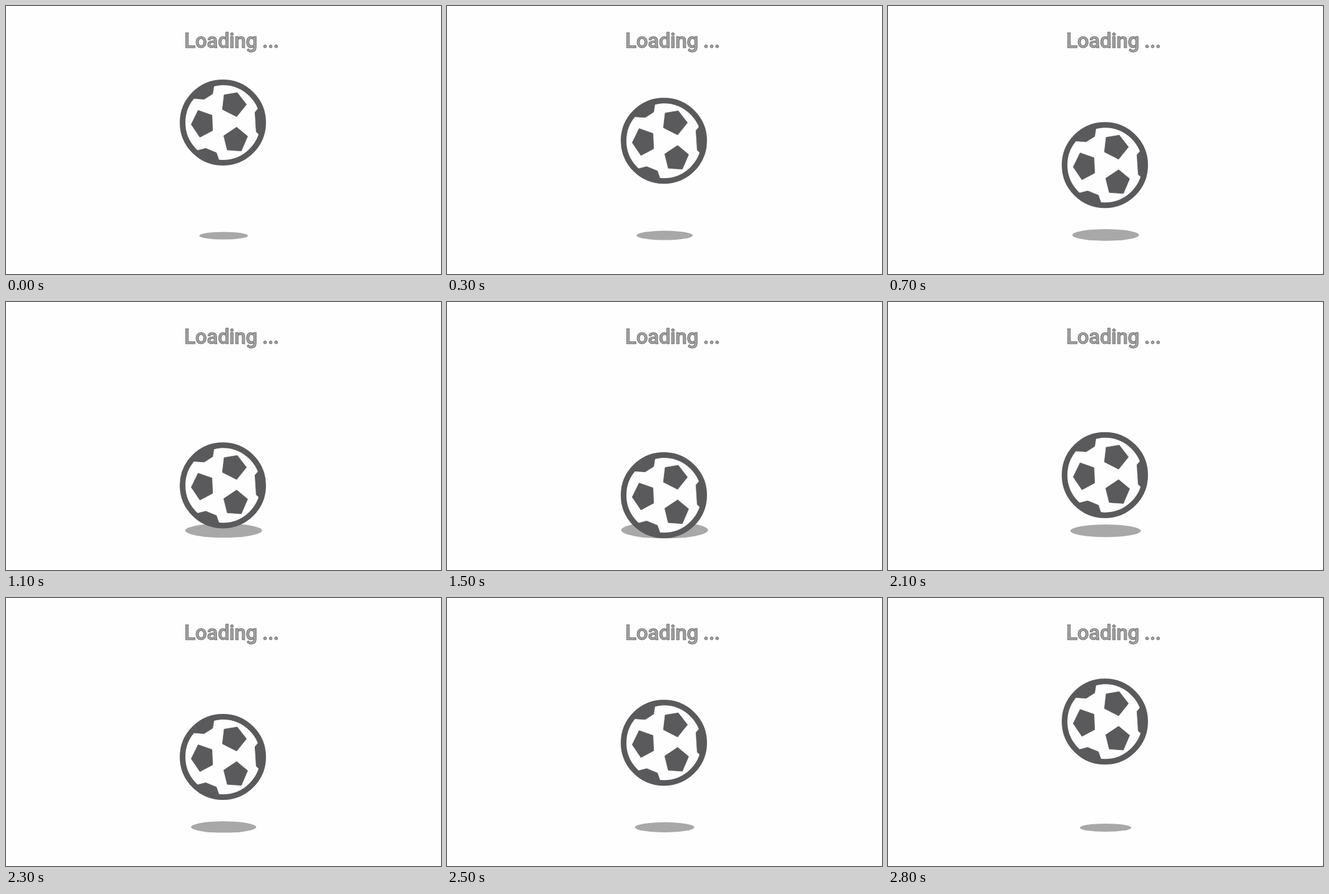
These frames come from a looping animation (696 px wide and 430 px high, 2.9 s). An HTML page:

```html
<!DOCTYPE html>
<html lang="en">
<head>
<meta charset="utf-8">
<title>Loading</title>
<style>
  html, body { margin: 0; width: 100%; height: 100%; overflow: hidden; background: #fefefe; }
  svg { display: block; width: 100vw; height: 100vh; }
  text {
    font: 500 33px Roboto, sans-serif;
    letter-spacing: -.3px;
    fill: #a4a4a4;
    stroke: #6c6c6c;
    stroke-width: 1;
  }
</style>
</head>
<body>
<svg viewBox="0 0 696 430">
  <text x="285.3" y="67">Loading</text>
  <text x="410" y="67">...</text>
  <ellipse id="shadow" cx="348.2" fill="#a8a8a8"/>
  <g id="ball" fill="#5a5a5c">
    <circle r="64.5" fill="#fefefe" stroke="#5a5a5c" stroke-width="9"/>
    <g stroke="#5a5a5c" stroke-width=".8" stroke-linejoin="round">
      <path d="M2-44.5L23-48 37.7-29 22-9.4-.7-21Z"/>
      <path d="M-39.6-19.6L-17.4-11.8-16.4 12.8-36.7 23.6-50.6 3Z"/>
      <path d="M22 7.4L39.6 22 29.5 45.6 7 44 1.4 21.2Z"/>
      <path d="M-46-38.6L-30-37.4-16.4-46-14.4-58.5-4-60.5-8-64-30-57-50-42Z"/>
      <path d="M-40 44.7L-27.5 41.4-10.4 48.4-6.4 60-8 64-28 58-43 48Z"/>
      <path d="M57.5-23.5L51.4-16.5 53.4 15 59 20 64 8 64-8Z"/>
    </g>
  </g>
</svg>
<script>
  const LOOP = 2900, STEP = 100, TURN = 1500;
  const ball = document.getElementById('ball');
  const shadow = document.getElementById('shadow');

  function draw(ms) {
    const t = Math.floor((ms % LOOP) / STEP) * STEP;

    // Constant speed down and up, resting on the floor between.
    const fall = 187 + 0.0975 * t;
    const rise = 187 + 0.1133 * (LOOP - t);
    const y = Math.min(fall, rise, 310);
    ball.setAttribute('transform', `translate(347 ${y.toFixed(2)})`);

    // The shadow keeps widening until the turn.
    const k = t < TURN ? t / TURN : (LOOP - t) / (LOOP - TURN);
    shadow.setAttribute('rx', 39 + 30.5 * k);
    shadow.setAttribute('ry', 6 + 7.3 * k);
    shadow.setAttribute('cy', 368.6 - 2.6 * k);
  }

  const start = performance.now();
  function tick() {
    draw(performance.now() - start);
    requestAnimationFrame(tick);
  }
  tick();
</script>
</body>
</html>
```
